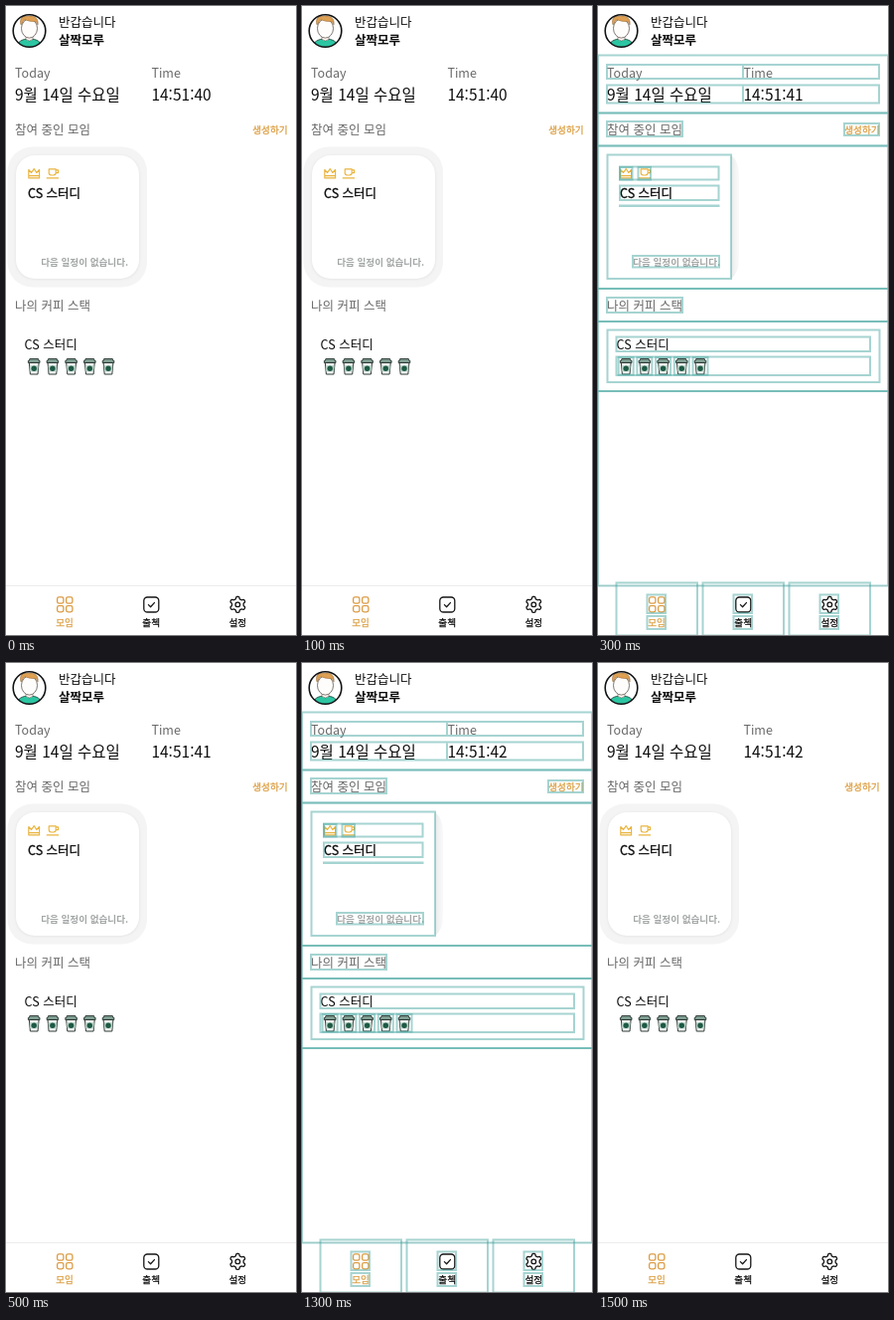
Write an HTML page that moves like this. It is 292 px wide and 632 px high and loops after 1.6 s.

```html
<!DOCTYPE html>
<html lang="ko">
<head>
<meta charset="utf-8">
<title>모임</title>
<style>
  html, body { margin: 0; width: 100%; height: 100%; overflow: hidden; background: #fff; }
  svg { display: block; width: 292px; height: 632px; }
  text {
    font: 400 12.5px "Noto Sans CJK KR", "Noto Sans KR", "Noto Sans CJK", "Noto Sans CJK JP", sans-serif;
    fill: #0c0c0c;
  }
  .big { font-size: 15.5px; }
  .head { font-weight: 300; fill: #686868; }
  .small { font-size: 9.6px; }
  .mid { text-anchor: middle; }
  .bold { font-weight: 700; }
  .medium { stroke: #0c0c0c; stroke-width: .3; }
  .amber { fill: #dca045; stroke: #dca045; }
  .muted { fill: #a3a6a6; font-weight: 700; }
  .line { fill: none; stroke: #161616; stroke-width: 1.3; stroke-linecap: round; stroke-linejoin: round; }
  .gold { stroke: #e9b43e; stroke-width: 1.15; }
  .orange { stroke: #dc9b43; }
  #boxes { fill: none; stroke: #46a69f; stroke-opacity: .48; stroke-width: 2; }

  .flash, .calm, .tick { animation: 1.6s step-end infinite; }
  .flash { animation-name: flash; }
  .calm { animation-name: calm; }
  .s40 { animation-name: s40; }
  .s41 { animation-name: s41; }
  .s42 { animation-name: s42; }
  @keyframes flash {
    0%, 31.25%, 93.75%, 100% { visibility: hidden; }
    18.75%, 81.25% { visibility: visible; }
  }
  @keyframes calm {
    0%, 31.25%, 93.75%, 100% { visibility: visible; }
    18.75%, 81.25% { visibility: hidden; }
  }
  @keyframes s40 { 0% { visibility: visible; } 12.5%, 100% { visibility: hidden; } }
  @keyframes s41 { 0%, 81.25%, 100% { visibility: hidden; } 12.5% { visibility: visible; } }
  @keyframes s42 { 0% { visibility: hidden; } 81.25%, 100% { visibility: visible; } }
</style>
</head>
<body>
<svg viewBox="0 0 292 632" xmlns="http://www.w3.org/2000/svg">
  <defs>
    <linearGradient id="fade">
      <stop offset="0" stop-color="#e9ebeb"/>
      <stop offset="1" stop-color="#fafafa"/>
    </linearGradient>
    <filter id="soft" x="-10%" y="-10%" width="120%" height="120%">
      <feGaussianBlur stdDeviation="1.2"/>
    </filter>
    <clipPath id="face"><circle cx="23.5" cy="25" r="16"/></clipPath>
    <g id="cup">
      <path d="M-4.9 4.5 L-3.8 16 H3.8 L4.9 4.5Z" fill="#f2f6f4" stroke="#2f3a36" stroke-width="1"/>
      <path d="M-4.4 7.2 H4.4 L3.9 13.2 H-3.9Z" fill="#b9d0c6"/>
      <circle cy="10.2" r="2.7" fill="#1d5a45"/>
      <path d="M-4.3 .5 H4.3 L4.8 2.4 H5.8 V4.5 H-5.8 V2.4 H-4.8Z" fill="#7d9c90" stroke="#26322e" stroke-width=".9"/>
    </g>
  </defs>

  <!-- profile -->
  <g clip-path="url(#face)">
    <path d="M11 42 C11 36 16 33 23.5 33 S36 36 36 42Z" fill="#2cc5a2" stroke="#1d3b36" stroke-width=".8"/>
    <path d="M20 29 V33.5 Q23.5 36.5 27 33.5 V29Z" fill="#fff8f3" stroke="#4a403a" stroke-width=".5"/>
    <ellipse cx="23.5" cy="22.5" rx="8" ry="9.6" fill="#fffdfb" stroke="#4a403a" stroke-width=".7"/>
    <path d="M14.8 18.5 C13.5 12 17 9.5 21 10.5 C26 8.8 33.5 11 32 19 L30.4 15.8 Q23 15.6 19 13.8 Q16.5 15 15.8 18.5Z" fill="#dea052" stroke="#8a5a26" stroke-width=".5"/>
  </g>
  <circle cx="23.5" cy="25" r="16.3" fill="none" stroke="#101214" stroke-width="1.6"/>
  <text x="53" y="21.3">반갑습니다</text>
  <text x="53" y="38.6" class="bold">살짝모루</text>

  <!-- date and time -->
  <text x="9" y="72" class="head">Today</text>
  <text x="146.4" y="72" class="head">Time</text>
  <text x="9" y="95.4" class="big">9월 14일 수요일</text>
  <text x="146.4" y="95.4" class="big tick s40">14:51:40</text>
  <text x="146.4" y="95.4" class="big tick s41">14:51:41</text>
  <text x="146.4" y="95.4" class="big tick s42">14:51:42</text>

  <!-- groups -->
  <text x="9" y="128.7" class="head">참여 중인 모임</text>
  <text x="248.3" y="127.8" class="small amber" stroke-width=".3">생성하기</text>
  <g class="calm">
    <rect x="1.5" y="141.5" width="140.5" height="141" rx="25" fill="#f4f4f4"/>
    <rect x="9.5" y="150" width="125" height="125" rx="19" fill="#e6e6e6" filter="url(#soft)"/>
    <rect x="10" y="150" width="124" height="124" rx="19" fill="#fff"/>
  </g>
  <path class="flash" d="M134 150 Q142 156 142 170 V254 Q142 268 134 274Z" fill="url(#fade)"/>
  <path class="line gold" d="M22.8 164.5 L25.6 167.5 L28.2 163.6 L30.8 167.5 L33.6 164.5 V172.8 H22.8Z M23 170.6 H33.4"/>
  <path class="line gold" d="M43.2 163.8 H50.2 V167.6 Q50.2 170 47.8 170 H45.6 Q43.2 170 43.2 167.6Z M50.2 164.8 H52.6 V167.6 H50.2 M41.2 172.9 H52.6"/>
  <text x="22" y="193.4" class="medium">CS 스터디</text>
  <text x="35.2" y="260.5" class="small muted">다음 일정이 없습니다.</text>

  <!-- coffee -->
  <text x="9" y="305.6" class="head">나의 커피 스택</text>
  <text x="18.6" y="345">CS 스터디</text>
  <g id="cups"></g>

  <!-- tab bar -->
  <path d="M0 582.5 H292" stroke="#ececec"/>
  <g class="line orange">
    <rect x="51.6" y="593.9" width="6.3" height="6.3" rx="1.8"/>
    <rect x="60.6" y="593.9" width="6.3" height="6.3" rx="1.8"/>
    <rect x="51.6" y="602.6" width="6.3" height="6.3" rx="1.8"/>
    <rect x="60.6" y="602.6" width="6.3" height="6.3" rx="1.8"/>
  </g>
  <g class="line">
    <rect x="138.8" y="594" width="15" height="15" rx="3.6"/>
    <path d="M143.4 601.6 L145.6 603.8 L149.4 599.6"/>
    <path id="gear"/>
    <circle cx="233.3" cy="601.4" r="2.3"/>
  </g>
  <g stroke-width=".25">
    <text x="59" y="622.8" class="small mid amber">모임</text>
    <text x="146.2" y="622.8" class="small mid" stroke="#0c0c0c">출첵</text>
    <text x="233.3" y="622.8" class="small mid" stroke="#0c0c0c">설정</text>
  </g>

  <g id="boxes" class="flash">
    <path d="M146 60 V72 M146 80.5 V96.5"/>
  </g>
</svg>
<script>
  const NS = "http://www.w3.org/2000/svg";
  const byId = id => document.getElementById(id);

  function add(parent, tag, attrs) {
    const node = document.createElementNS(NS, tag);
    for (const key in attrs) node.setAttribute(key, attrs[key]);
    parent.appendChild(node);
  }

  function box(x, y, width, height) {
    add(byId("boxes"), "rect", { x, y, width, height });
  }

  // Page sections, stacked at full width
  const edges = [49.5, 107.5, 140.5, 284, 317, 387, 582.5];
  edges.slice(1).forEach((y, i) => box(0, edges[i], 292, y - edges[i]));

  // Blocks inside the sections
  [
    [9, 59, 274, 14], [9, 79.5, 274, 18],
    [9, 116, 76, 15], [248, 118, 35, 12],
    [9.5, 149.5, 124.5, 124.5], [22, 161.5, 99.5, 13], [22, 180.5, 99.5, 14.5],
    [22, 200.5, 99.5, .5], [35, 251, 87, 11.5],
    [9, 293, 76, 15], [9.5, 325.5, 274, 52.5],
    [18.5, 332.5, 255.5, 14.5], [18.5, 352.5, 255.5, 18.5]
  ].forEach(b => box(...b));

  for (const x of [22, 40.5]) box(x, 162, 12.5, 12.5);

  for (let i = 0; i < 5; i++) {
    const x = 28.2 + i * 18.7;
    add(byId("cups"), "use", { href: "#cup", x, y: 354 });
    box(x - 7.5, 353, 15, 17.5);
  }

  for (let i = 0; i < 3; i++) {
    const x = 18.5 + i * 87;
    box(x, 579.5, 81.5, 53);
    box(x + 31, 591.5, 18.5, 18.5);
    box(x + 31, 613, 18.5, 13);
  }

  // Six rounded teeth
  let gear = "";
  for (let a = 0; a < 360; a += 6) {
    const t = a * Math.PI / 180;
    const r = 6.9 + 1.1 * Math.tanh(2.5 * Math.cos(6 * t + Math.PI));
    gear += `${a ? "L" : "M"}${(233.3 + r * Math.cos(t)).toFixed(2)} ${(601.4 + r * Math.sin(t)).toFixed(2)}`;
  }
  byId("gear").setAttribute("d", gear + "Z");
</script>
</body>
</html>
```
